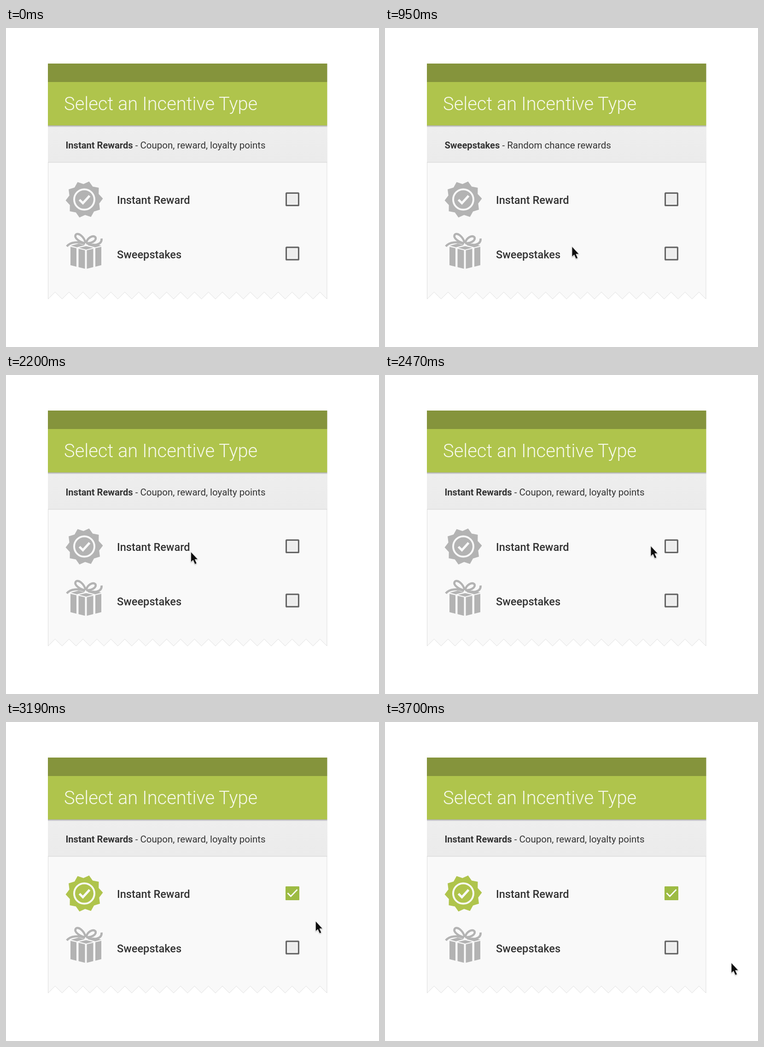
These frames come from a looping animation (810x691 px, 4.53 s). An HTML page:

```html
<!DOCTYPE html>
<html lang="en">
<head>
<meta charset="utf-8">
<title>Select an Incentive Type</title>
<style>
  html, body { margin: 0; width: 100%; height: 100%; overflow: hidden; background: #fff; }
  svg { display: block; }
  text { font-family: Roboto, sans-serif; fill: #333; white-space: pre; }
  .title { font-size: 39.9px; font-weight: 300; fill: #f7f9ec; }
  .hint { font-size: 20.5px; }
  #kind { font-size: 20.1px; font-weight: 700; }
  .label { font-size: 23.6px; font-weight: 500; }
  .line { fill: none; }
</style>
</head>
<body>
<svg width="810" height="691" viewBox="0 0 810 691">
  <defs>
    <linearGradient id="shade" x2="0" y2="1">
      <stop stop-color="#000" stop-opacity=".3"/>
      <stop offset="1" stop-color="#000" stop-opacity="0"/>
    </linearGradient>
    <linearGradient id="strip" x2="0" y2="1">
      <stop stop-color="#eeeeee"/>
      <stop offset="1" stop-color="#ebebeb"/>
    </linearGradient>
    <filter id="soft" x="-50%" y="-50%" width="200%" height="200%">
      <feDropShadow dx="0" dy="1" stdDeviation="1" flood-opacity=".35"/>
    </filter>
    <g id="box">
      <rect x="1.6" y="1.6" width="26.8" height="26.8" rx="1" fill="#fafafa" stroke="#666" stroke-width="3.2"/>
      <rect x="5" y="5" width="20" height="20" fill="#ededed"/>
    </g>
  </defs>

  <path id="card" fill="#f9f9f9" stroke="#dedede"/>
  <rect x="91" y="77" width="606.5" height="40" fill="#85943c"/>
  <rect x="91" y="117" width="606.5" height="94" fill="#afc44c"/>
  <rect x="91" y="211" width="606.5" height="80" fill="url(#strip)"/>
  <rect x="91" y="211" width="606.5" height="4" fill="url(#shade)"/>
  <rect x="91" y="290.5" width="606.5" height="1" fill="#d4d4d4"/>

  <text class="title" x="126" y="178">Select an Incentive Type</text>
  <text class="hint" x="129.5" y="261"><tspan id="kind"></tspan><tspan id="about"></tspan></text>
  <text class="label" x="241" y="381">Instant Reward</text>
  <text class="label" x="241" y="498.5">Sweepstakes</text>

  <path id="badge"/>
  <g class="line" stroke="#f9f9f9">
    <circle cx="170" cy="371.5" r="22" stroke-width="4"/>
    <path d="M159.5 372L167 379.5L181.5 363.5" stroke-width="5"/>
  </g>

  <g fill="#b3b3b3">
    <path id="panels"/>
    <path d="M141 471.5L158 467L171 470.5L154 475ZM177 470.5L190 467L207 471.5L194 475ZM158.5 476L174 472.5L189.5 476L174 480Z"/>
    <g class="line" stroke="#b3b3b3" stroke-width="4.6">
      <path d="M172 466C160 464 148 455 151 448.5C156 441 170 452 173 466"/>
      <path d="M174 466C176 455 188 448 194 453C198 460 186 467 174 466"/>
      <path d="M171 468C158 462 140 463 132 473M177 467C190 473 209 470 207.5 456"/>
    </g>
  </g>

  <circle id="ripple" cx="622" cy="371" r="40" fill="#9dbb43" opacity=".25"/>
  <use href="#box" x="607" y="356"/>
  <use href="#box" x="607" y="473.5"/>
  <g id="tick">
    <rect x="607" y="356" width="30" height="30" rx="1.5" fill="#9dbb43"/>
    <path class="line" d="M611.5 370.5L618.5 377.5L632.5 363" stroke="#fff" stroke-width="2.7"/>
  </g>

  <path id="cursor" filter="url(#soft)" fill="#0c0c0c" stroke="#fff" stroke-width=".8"
    d="M1 .5V22.8L5.8 18.500L9.700 27.300L13.700 25.500L9.800 17H16.300Z"/>
</svg>
<script>
const $ = id => document.getElementById(id);
const LOOP = 4530, STEP = 30;

// start time, step count, from, to
const moves = [
  [200, 6, [596, 522.6], [411, 495]],
  [950, 5, [411, 495], [381, 384]],
  [2200, 12, [381, 384], [615, 367]],
  [2860, 29, [615, 367], [751, 521]],
];
const hints = [
  ['Instant Rewards', ' - Coupon, reward, loyalty points'],
  ['Sweepstakes', ' - Random chance rewards'],
];

function drawCard() {
  const teeth = 20, left = 91.5, w = 605.5 / teeth;
  let d = `M${left} 77.5V587`;
  for (let i = 0; i < teeth; i++) d += `L${left + (i + .5) * w} 572L${left + (i + 1) * w} 587`;
  $('card').setAttribute('d', d + 'V77.5Z');
}

function drawBadge() {
  const points = [];
  for (let i = 0; i < 20; i++) {
    const r = i % 2 ? 33.5 : 40.5, a = (i * 18 - 3) * Math.PI / 180;
    points.push(`${170 + r * Math.cos(a)} ${371.5 + r * Math.sin(a)}`);
  }
  $('badge').setAttribute('d', `M${points.join('L')}Z`);
}

function drawPanels() {
  const top = x => 482 - Math.abs(x - 173.5) * .24;
  const bottom = x => 522 - Math.abs(x - 173.5) * .25;
  const panel = ([a, b]) => `M${a} ${top(a)}L${b} ${top(b)}V${bottom(b)}L${a} ${bottom(a)}Z`;
  $('panels').setAttribute('d',
    [[140, 153], [157.5, 171.5], [175.5, 189.5], [194, 207]].map(panel).join(''));
}

function cursorAt(t) {
  const [start, steps, from, to] = moves.findLast(m => t >= m[0]) || moves[0];
  const k = Math.min(steps, Math.floor((t - start) / STEP) + 1) / steps;
  return from.map((v, i) => v + (to[i] - v) * k);
}

const show = (id, on) => $(id).setAttribute('visibility', on ? 'visible' : 'hidden');

function render(t) {
  const picked = t >= 2560;
  const [kind, about] = hints[t >= 200 && t < 1010 ? 1 : 0];
  $('kind').textContent = kind;
  $('about').textContent = about;
  $('badge').setAttribute('fill', picked ? '#afc44c' : '#b3b3b3');
  show('tick', picked);
  show('ripple', picked && t < 2760);
  show('cursor', t >= 200);
  $('cursor').setAttribute('transform', `translate(${cursorAt(t)})`);
}

let began;
function tick(now) {
  began ??= now;
  render((now - began) % LOOP);
  requestAnimationFrame(tick);
}

drawCard();
drawBadge();
drawPanels();
render(0);
requestAnimationFrame(tick);
</script>
</body>
</html>
```
